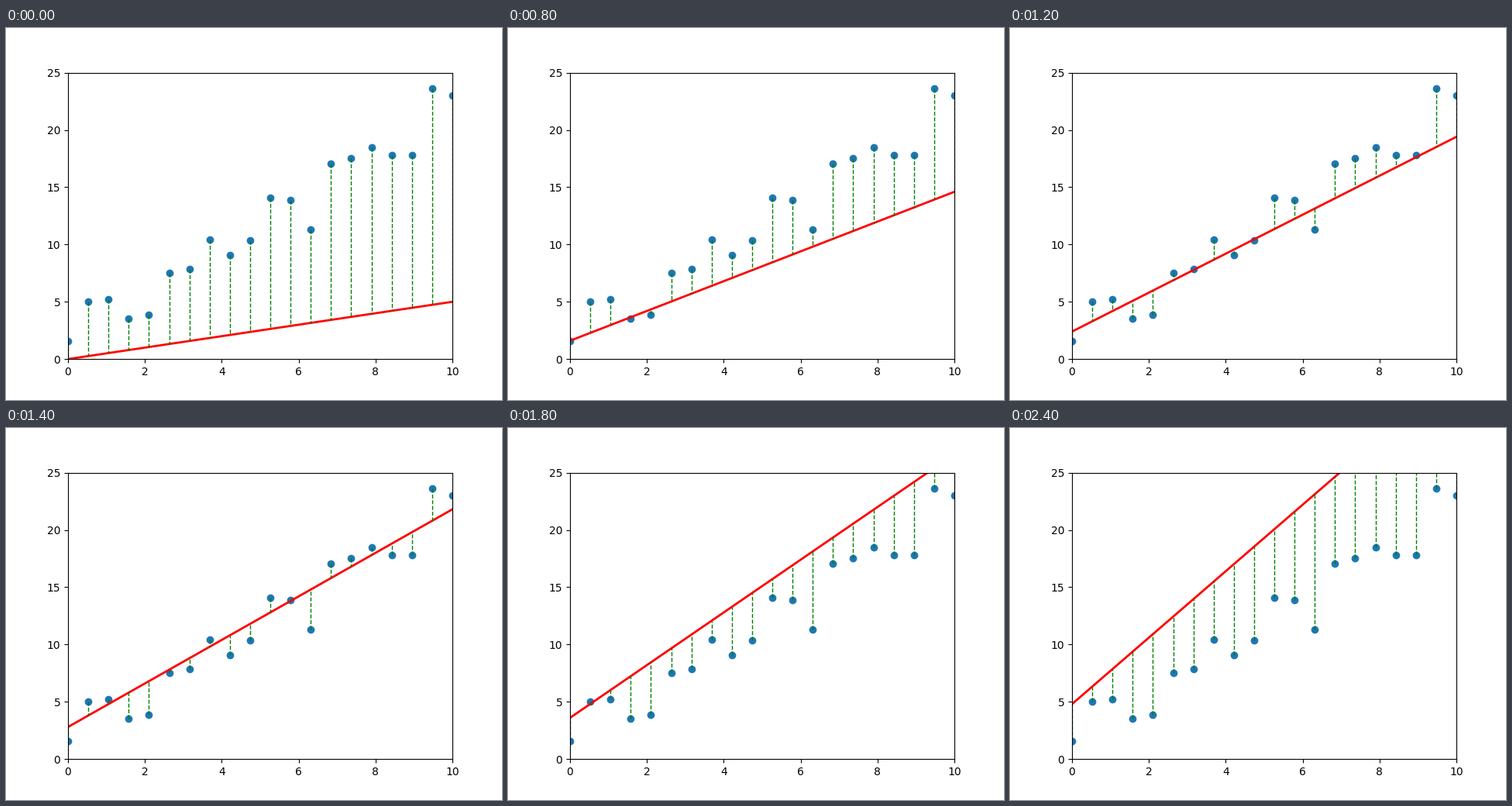
Write a matplotlib script that moves like this. It is 640 px wide and 480 px high and loops after 2.5 s.

```python
import matplotlib.pyplot as plt
import numpy as np
from matplotlib.animation import FuncAnimation

FRAMES = 25
INTERVAL = 100

x = np.linspace(0, 10, 20)
y = np.array([1.60, 5.05, 5.19, 3.50, 3.84, 7.49, 7.83, 10.46, 9.11, 10.33,
              14.05, 13.91, 11.28, 17.03, 17.50, 18.45, 17.77, 17.77, 23.59, 22.98])

fig, ax = plt.subplots(figsize=(6.4, 4.8), dpi=100)
ax.set_xlim(0, 10)
ax.set_ylim(0, 25)
ax.scatter(x, y)
fit_line, = ax.plot([], [], "r-", lw=2)
residuals = [ax.plot([], [], "g--", lw=1)[0] for _ in x]


def update(i):
    slope = 0.5 + 0.1 * i
    intercept = 0.2 * i
    fit = slope * x + intercept
    fit_line.set_data(x, fit)
    for line, xi, yi, fi in zip(residuals, x, y, fit):
        line.set_data([xi, xi], [yi, fi])
    return [fit_line, *residuals]


anim = FuncAnimation(fig, update, frames=FRAMES, interval=INTERVAL,
                     repeat=True, repeat_delay=0)
plt.show()
```
